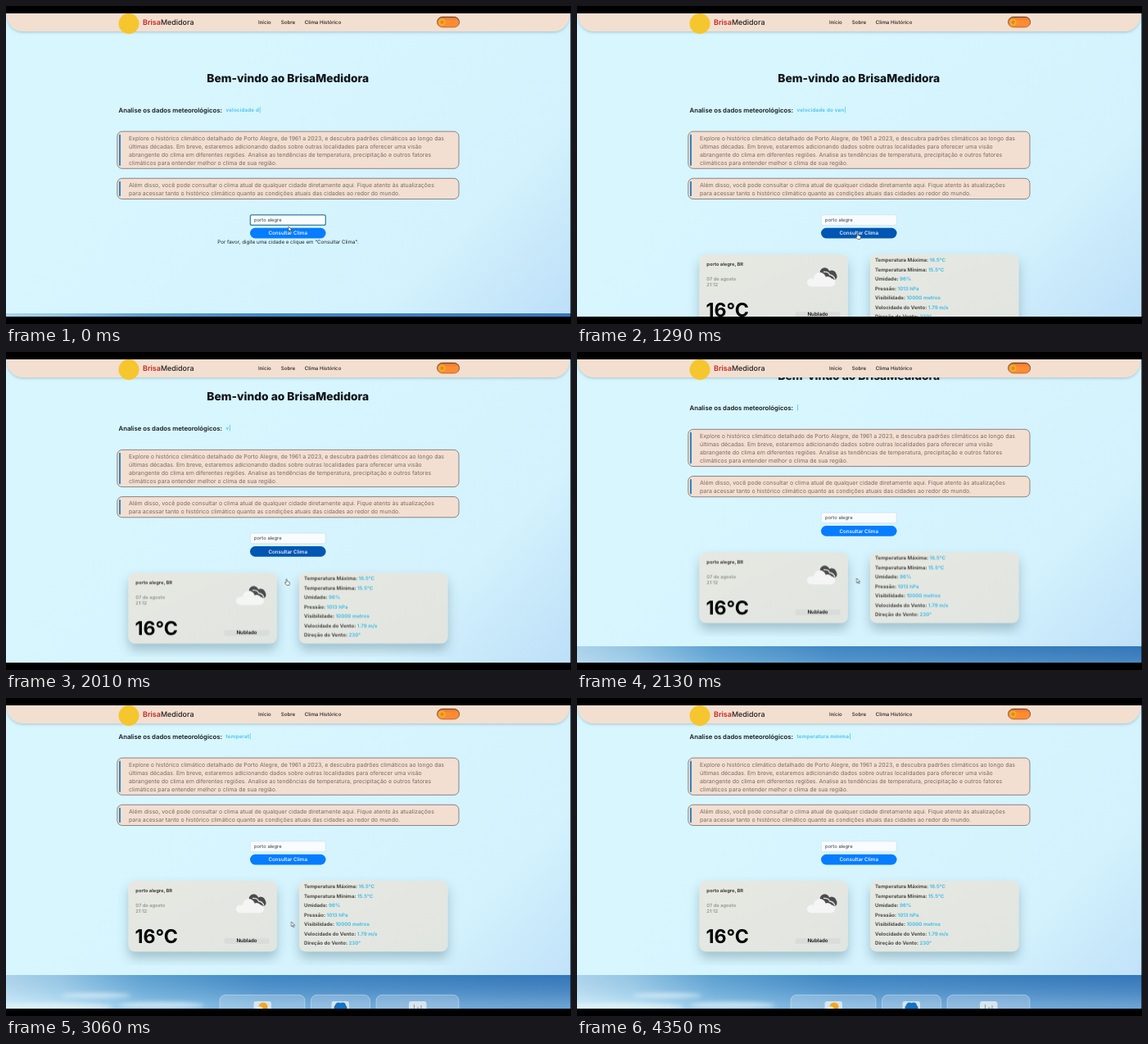
Recreate the animation shown at these times as an HTML page. Size 690 by 388 pixels, loop 4.44 s.

```html
<!DOCTYPE html>
<html lang="pt-BR">
<head>
<meta charset="utf-8">
<title>BrisaMedidora</title>
<style>
html, body { margin: 0; width: 100%; height: 100%; overflow: hidden; background: #000; }
svg { display: block; width: 690px; height: 388px; }
text {
  font-family: Inter, "Open Sans", sans-serif;
  text-rendering: geometricPrecision;
  white-space: pre;
}
.mid { text-anchor: middle; }
.title { font-size: 13.8px; font-weight: 800; fill: #10151a; }
.lead { font-size: 7.75px; font-weight: 600; fill: #14191d; }
.typed { font-size: 6.2px; font-weight: 600; fill: #41c3e8; letter-spacing: .2px; }
.para { font-size: 7px; fill: #786a64; }
.nav { font-size: 6.15px; font-weight: 500; fill: #25211f; }
.brand { font-size: 8.95px; font-weight: 500; fill: #25211f; }
.brand tspan { font-weight: 600; fill: #c3231f; }
.field { font-size: 5.85px; fill: #3b4147; }
.btn { font-size: 6.25px; font-weight: 500; fill: #fff; }
.note { font-size: 6.2px; fill: #1b2329; }
.city { font-size: 5.75px; font-weight: 700; fill: #3c3d39; }
.date { font-size: 5.75px; font-weight: 600; fill: #92948f; }
.temp { font-size: 23.2px; font-weight: 700; fill: #060606; }
.sky { font-size: 6.2px; font-weight: 600; fill: #111; }
.data { font-size: 6.1px; font-weight: 700; fill: #4b4a45; }
.data tspan { fill: #45bfe6; }
.box { fill: #f3dfd1; stroke: #75696a; stroke-width: .8; }
.bar { fill: #2f86c0; }
.card { fill: url(#cardFill); filter: url(#cardShadow); }
.glass { fill: #fff; fill-opacity: .22; stroke: #fff; stroke-opacity: .5; stroke-width: .7; }

#page, #button, #input, #pointer, #footer, .until-click, .loading, .after, .hand, .arrow {
  animation: 4440ms linear infinite;
}
#page { animation-name: scroll; }
@keyframes scroll {
  0%, 40% { transform: translateY(0); animation-timing-function: ease-in; }
  42.568% { transform: translateY(-5.5px); }
  45.27% { transform: translateY(-33.5px); }
  47.973% { transform: translateY(-58.5px); animation-timing-function: ease-out; }
  51.5%, 100% { transform: translateY(-80px); }
}
#button { animation-name: hover; }
@keyframes hover {
  0%, 1.5% { fill: #067cff; }
  6%, 46.4% { fill: #0056b3; }
  47.7%, 100% { fill: #067cff; }
}
#input { animation-name: blur; }
@keyframes blur {
  0%, 8.8% { stroke: #2b7f9f; stroke-width: 1.2px; }
  11%, 100% { stroke: #ccdbe2; stroke-width: .6px; }
}
#pointer { animation-name: roam; }
@keyframes roam {
  0% { transform: translate(345px, 269px); animation-timing-function: ease-out; }
  8.8%, 46% { transform: translate(342px, 277px); }
  47.9%, 54% { transform: translate(341.5px, 276px); animation-timing-function: ease-in-out; }
  65.5% { transform: translate(361px, 277px); animation-timing-function: ease-out; }
  68.9%, 73% { transform: translate(348.5px, 273px); animation-timing-function: ease-in-out; }
  88%, 100% { transform: translate(398px, 382px); }
}
#footer { animation-name: drop; }
@keyframes drop {
  0%, 27.69% { transform: translateY(-43px); }
  27.7%, 100% { transform: none; }
}
.until-click { animation-name: untilClick; }
@keyframes untilClick {
  0%, 10.8% { visibility: visible; }
  10.81%, 100% { visibility: hidden; }
}
.loading { animation-name: loading; }
@keyframes loading {
  0%, 10.8% { visibility: hidden; }
  10.81%, 27.69% { visibility: visible; }
  27.7%, 100% { visibility: hidden; }
}
.after { animation-name: after; }
@keyframes after {
  0%, 27.69% { visibility: hidden; }
  27.7%, 100% { visibility: visible; }
}
.hand { animation-name: hand; }
@keyframes hand {
  0%, 2% { visibility: hidden; }
  2.01%, 46.4% { visibility: visible; }
  46.41%, 100% { visibility: hidden; }
}
.arrow { animation-name: arrow; }
@keyframes arrow {
  0%, 2% { visibility: visible; }
  2.01%, 46.4% { visibility: hidden; }
  46.41%, 100% { visibility: visible; }
}
</style>
</head>
<body>
<svg viewBox="0 0 690 388">
  <defs>
    <linearGradient id="air" gradientUnits="userSpaceOnUse" x1="80" y1="-71" x2="610" y2="459">
      <stop offset=".3" stop-color="#d7f6fe"/>
      <stop offset=".77" stop-color="#d3f2fd"/>
      <stop offset="1" stop-color="#bddff8"/>
    </linearGradient>
    <linearGradient id="cardFill" x2="1" y2="1">
      <stop stop-color="#e7e8e2"/>
      <stop offset="1" stop-color="#e1e5e0"/>
    </linearGradient>
    <linearGradient id="deep" gradientUnits="userSpaceOnUse" x1="0" y1="450" x2="690" y2="330">
      <stop stop-color="#d2effb"/>
      <stop offset=".1" stop-color="#b4def3"/>
      <stop offset=".24" stop-color="#6fb1dc"/>
      <stop offset=".45" stop-color="#4a90cb"/>
      <stop offset="1" stop-color="#3a7bbd"/>
    </linearGradient>
    <linearGradient id="haze" x2="0" y2="1">
      <stop stop-color="#1d64a8" stop-opacity=".2"/>
      <stop offset=".4" stop-color="#bfe2f5" stop-opacity=".35"/>
      <stop offset="1" stop-color="#d8eef8" stop-opacity=".6"/>
    </linearGradient>
    <linearGradient id="orange" x2="0" y2="1">
      <stop stop-color="#e8742a"/>
      <stop offset=".4" stop-color="#ff8c32"/>
    </linearGradient>
    <linearGradient id="rim" x2="0" y2="1">
      <stop stop-color="#3d2a24"/>
      <stop offset="1" stop-color="#b8683a"/>
    </linearGradient>
    <filter id="cardShadow" x="-20%" y="-20%" width="140%" height="170%">
      <feDropShadow dx="0" dy="8" stdDeviation="6.5" flood-color="#3d6070" flood-opacity=".34"/>
    </filter>
    <filter id="headShadow" x="-5%" y="-20%" width="110%" height="160%">
      <feDropShadow dx="0" dy="1.5" stdDeviation="1.5" flood-color="#4d6a78" flood-opacity=".3"/>
    </filter>
    <filter id="soft" x="-30%" y="-80%" width="160%" height="260%"><feGaussianBlur stdDeviation="2.5"/></filter>
    <clipPath id="panel"><rect x="135" y="285" width="420" height="121"/></clipPath>
  </defs>

  <rect y="9" width="690" height="370" fill="url(#air)"/>

  <g id="page">
    <text class="title mid" x="344.3" y="93">Bem-vindo ao BrisaMedidora</text>
    <text class="lead" x="137.5" y="129.6">Analise os dados meteorológicos:</text>
    <text class="typed" id="typed" x="268.5" y="128.9"></text>

    <rect class="box" x="135.8" y="153.1" width="417.2" height="45.2" rx="6"/>
    <rect class="bar" x="138" y="156.5" width="2" height="38.5" rx="1"/>
    <text class="para" y="163.7">
      <tspan x="150">Explore o histórico climático detalhado de Porto Alegre, de 1961 a 2023, e descubra padrões climáticos ao longo das</tspan><tspan x="150" dy="10">últimas décadas. Em breve, estaremos adicionando dados sobre outras localidades para oferecer uma visão</tspan><tspan x="150" dy="10">abrangente do clima em diferentes regiões. Analise as tendências de temperatura, precipitação e outros fatores</tspan><tspan x="150" dy="10">climáticos para entender melhor o clima de sua região.</tspan>
    </text>

    <rect class="box" x="135.8" y="210.3" width="417.2" height="25.2" rx="6"/>
    <rect class="bar" x="138" y="213.8" width="2" height="18.4" rx="1"/>
    <text class="para" y="221">
      <tspan x="150">Além disso, você pode consultar o clima atual de qualquer cidade diretamente aqui. Fique atento às atualizações</tspan><tspan x="150" dy="10">para acessar tanto o histórico climático quanto as condições atuais das cidades ao redor do mundo.</tspan>
    </text>

    <rect id="input" x="298.3" y="254.8" width="92" height="12.6" rx="2" fill="#f8fcfe"/>
    <text class="field" x="303" y="263">porto alegre</text>
    <rect id="button" x="298" y="270.8" width="92.6" height="12.6" rx="6.3"/>
    <text class="btn mid until-click" x="344.2" y="279.3">Consultar Clima</text>
    <text class="btn mid loading" x="344.2" y="279.3">Carregando...</text>
    <text class="btn mid after" x="344.2" y="279.3">Consultar Clima</text>
    <text class="note mid until-click" x="344.5" y="290.3">Por favor, digite uma cidade e clique em "Consultar Clima".</text>
    <text class="note mid loading" x="344.3" y="290.3">Aguarde, carregando os dados...</text>

    <g class="after" clip-path="url(#panel)">
      <rect class="card" x="149.5" y="303" width="181.3" height="86.3" rx="8"/>
      <text class="city" x="158.3" y="317.4">porto alegre, BR</text>
      <text class="date" x="158.3" y="335">07 de agosto</text>
      <text class="date" x="158.3" y="342.3">21:12</text>
      <text class="temp" x="157.5" y="379">16°C</text>
      <g fill="#4b4b4e">
        <circle cx="302.5" cy="325" r="5.8"/>
        <circle cx="311" cy="328" r="5.6"/>
        <rect x="299" y="326" width="18.5" height="8" rx="4"/>
      </g>
      <path d="M301 324.500q6-1 7.500 3.500 5 .5 6.500 5.500" fill="none" stroke="#dfe1dd" stroke-width="1.300"/>
      <g fill="#f4f5f4">
        <circle cx="296.500" cy="332.500" r="7.400"/>
        <circle cx="306" cy="335.500" r="5.600"/>
        <rect x="280.800" y="332.600" width="34.500" height="9.600" rx="4.800"/>
      </g>
      <rect x="266.500" y="373" width="55" height="7" rx="2" fill="#d9dcd9"/>
      <text class="sky mid" x="294" y="378.400">Nublado</text>

      <rect class="card" x="358" y="303" width="181.500" height="86.300" rx="8"/>
      <g id="data"></g>
    </g>

    <g id="footer">
      <rect y="418" width="690" height="90" fill="url(#deep)"/>
      <rect y="418" width="690" height="90" fill="url(#haze)"/>
      <g fill="#eaf5fa" opacity=".65" filter="url(#soft)">
        <ellipse cx="110" cy="443" rx="42" ry="3"/>
        <ellipse cx="190" cy="455" rx="52" ry="4"/>
        <ellipse cx="60" cy="457" rx="70" ry="5"/>
      </g>
      <rect class="glass" x="261" y="442.300" width="104" height="60" rx="7"/>
      <rect class="glass" x="372.500" y="442.300" width="72" height="60" rx="7"/>
      <rect class="glass" x="452" y="442.300" width="101" height="60" rx="7"/>
      <g fill="#eef3f6" fill-opacity=".75">
        <rect x="302.500" y="450" width="21.500" height="21" rx="3"/>
        <rect x="397.500" y="450" width="21.500" height="21" rx="3"/>
        <rect x="492" y="450" width="21.500" height="21" rx="3"/>
      </g>
      <circle cx="314" cy="457" r="5.500" fill="#f5a623"/>
      <path d="M306 461a4 4 0 0 1 8-1 3 3 0 0 1 4 3h-12z" fill="#f3f6f8"/>
      <g fill="#1673c4">
        <circle cx="406" cy="456" r="4.400"/>
        <circle cx="411" cy="455.500" r="4"/>
        <rect x="400.500" y="455" width="16" height="6" rx="3"/>
      </g>
      <path d="M498.500 454v9M503 457v6M507 455v8" stroke="#8996a0"/>
    </g>
  </g>

  <rect x="1" y="-14" width="687" height="45" rx="20" fill="#f3dfd0" filter="url(#headShadow)"/>
  <circle cx="150" cy="21.500" r="12.500" fill="#f6c62e"/>
  <text class="brand" x="167" y="22.900"><tspan>Brisa</tspan>Medidora</text>
  <text class="nav" x="308" y="21.800">Início</text>
  <text class="nav" x="335.800" y="21.800">Sobre</text>
  <text class="nav" x="364.800" y="21.800">Clima Histórico</text>
  <rect x="526.600" y="13.400" width="27" height="12.500" rx="6.250" fill="url(#orange)" stroke="url(#rim)" stroke-width=".9"/>
  <circle cx="532.600" cy="19.700" r="4" fill="#f2b02c"/>
  <circle cx="532.600" cy="19.700" r="2.200" fill="#d98f1c"/>

  <g id="pointer" stroke="#333" stroke-width=".6" stroke-linejoin="round" fill="#fff">
    <path class="arrow" d="M0 0v5.800l1.400-1.200 1 2.200 1-.45-1-2.150h1.800z"/>
    <path class="hand" d="M0 .5q.6-.9 1.200 0v2.300l2.600.6q.8.300.7 1.200l-.5 2.900h-3.300l-2-2.600q-.2-.9.7-.7l.6.600z"/>
  </g>

  <rect width="690" height="9"/>
  <rect y="379" width="690" height="9"/>
  <rect x="689.400" width=".6" height="388"/>
</svg>
<script>
const LOOP = 4440;
const FIRST = "velocidade do vento", SECOND = "temperatura mínima";
const readings = [
  ["Temperatura Máxima", "16.5°C"], ["Temperatura Mínima", "15.5°C"],
  ["Umidade", "96%"], ["Pressão", "1013 hPa"], ["Visibilidade", "10000 metros"],
  ["Velocidade do Vento", "1.79 m/s"], ["Direção do Vento", "230°"]
];
document.getElementById("data").innerHTML = readings.map(([label, value], i) =>
  `<text class="data" x="364" y="${312.3 + i * 11.45}">${label}: <tspan>${value}</tspan></text>`).join("");

// Type the first phrase, hold, erase it, then type the second.
function phrase(t) {
  if (t < 870) return FIRST.slice(0, 19 - Math.ceil((870 - t) / 140));
  if (t < 1230) return FIRST;
  if (t < 2070) return FIRST.slice(0, Math.max(1, 18 - Math.floor((t - 1230) / 38)));
  if (t < 2170) return "";
  return SECOND.slice(0, 1 + Math.floor((t - 2170) / 127));
}

const typed = document.getElementById("typed");
let start;
function frame(now) {
  start ??= now;
  const text = phrase((now - start) % LOOP) + "|";
  if (typed.textContent !== text) typed.textContent = text;
  requestAnimationFrame(frame);
}
requestAnimationFrame(frame);
</script>
</body>
</html>
```
